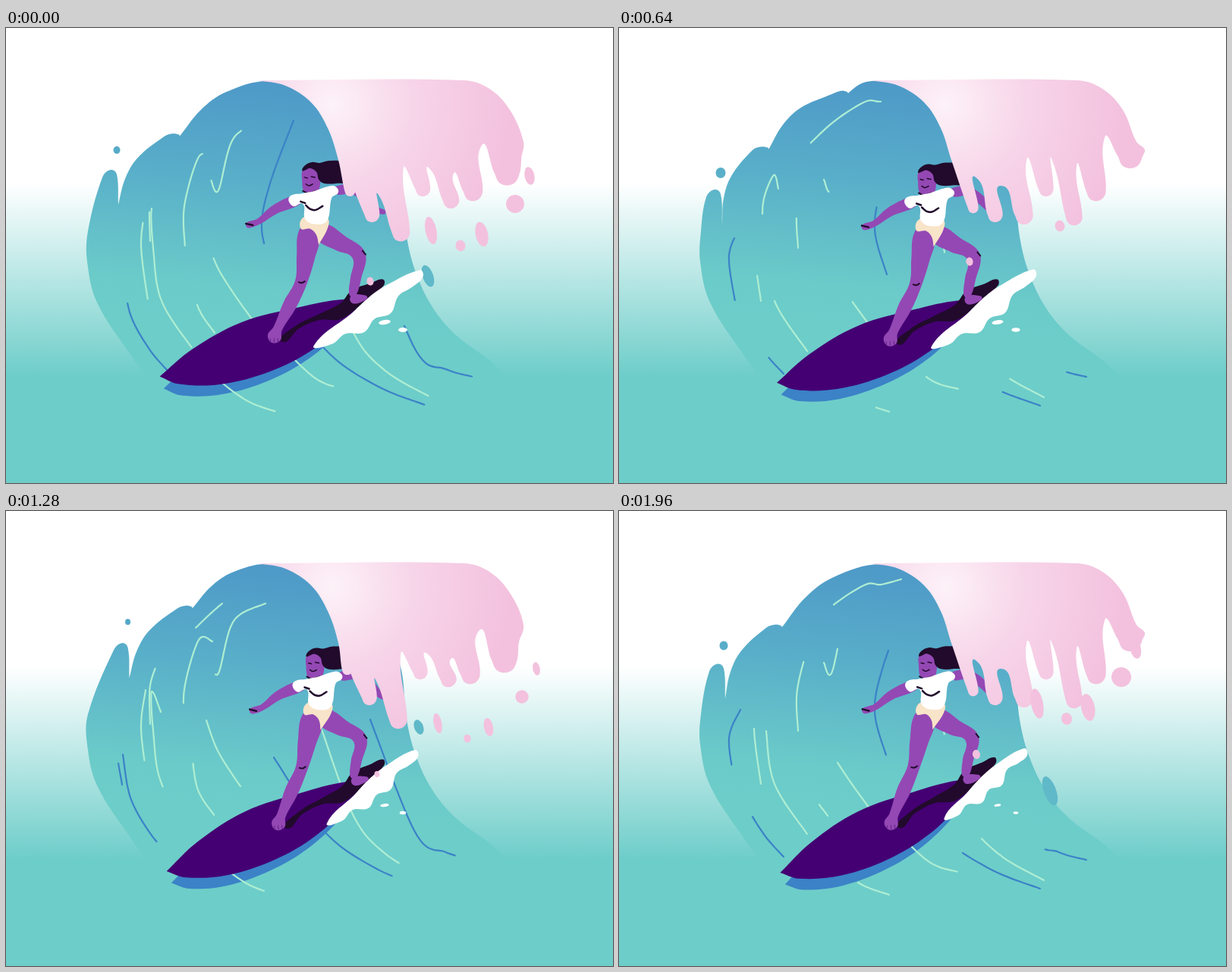
An HTML page with a canvas that plays this animation: 800x600 px, repeating every 2 s.

```html
<!DOCTYPE html>
<html lang="en">
<head>
<meta charset="utf-8">
<title>Surfer on a wave</title>
<style>
  html, body { margin: 0; width: 100%; height: 100%; overflow: hidden; background: #fff; }
  canvas { display: block; width: 800px; height: 600px; }
</style>
</head>
<body>
<canvas id="stage" width="800" height="600"></canvas>
<script>
const ctx = document.getElementById('stage').getContext('2d');
const { sin, cos, PI, min, max, hypot } = Math;

const pts = s => s.trim().split(/\s+/).map(p => p.split(',').map(Number));
const clamp = v => max(0, min(1, v));
const mix = (a, b, k) => a.map((v, i) => v + (b[i] - v) * k);

// Point at share u of a Catmull-Rom curve.
function along(p, u) {
  const n = p.length - 1, i = min(n - 1, Math.floor(u * n)), t = u * n - i;
  const [a, b, c, d] = [p[max(0, i - 1)], p[i], p[i + 1], p[min(n, i + 2)]];
  return b.map((v, j) => v + 0.5 * t * (c[j] - a[j] + t * (2 * a[j] - 5 * v + 4 * c[j] - d[j]
    + t * (3 * (v - c[j]) + d[j] - a[j]))));
}

// Smooth path through points; a doubled point makes a corner.
function trace(p, closed) {
  const n = p.length;
  const at = i => closed ? p[(i + n) % n] : p[max(0, min(n - 1, i))];
  const dir = i => {
    const [a, b] = [at(i - 1), at(i + 1)];
    const dx = b[0] - a[0], dy = b[1] - a[1], d = hypot(dx, dy) || 1;
    return [dx / d, dy / d];
  };
  ctx.beginPath();
  ctx.moveTo(...p[0]);
  for (let i = 0; i < (closed ? n : n - 1); i++) {
    const a = at(i), b = at(i + 1), u = dir(i), v = dir(i + 1);
    const h = hypot(b[0] - a[0], b[1] - a[1]) * 0.36;
    ctx.bezierCurveTo(a[0] + u[0] * h, a[1] + u[1] * h, b[0] - v[0] * h, b[1] - v[1] * h, ...b);
  }
}
function fill(p, color) {
  trace(p, true);
  ctx.fillStyle = color;
  ctx.fill();
}
function stroke(p, color, width) {
  trace(p, false);
  ctx.strokeStyle = color;
  ctx.lineWidth = width;
  ctx.lineCap = 'round';
  ctx.stroke();
}
function oval(x, y, rx, ry, color, tilt = 0) {
  ctx.fillStyle = color;
  ctx.beginPath();
  ctx.ellipse(x, y, max(0, rx), max(0, ry), tilt, 0, 2 * PI);
  ctx.fill();
}
// Rounded limb along joints given as x, y, half width.
function limb(joints, place, color) {
  const c = joints.map(j => place(j)), last = c.length - 1;
  const left = [], right = [];
  const axis = i => {
    const a = c[max(0, i - 1)], b = c[min(last, i + 1)];
    const d = hypot(b[0] - a[0], b[1] - a[1]);
    return [(b[0] - a[0]) / d, (b[1] - a[1]) / d];
  };
  const cap = (i, side) => {
    const [x, y] = axis(i), w = joints[i][2] * side * 0.8;
    return [c[i][0] + x * w, c[i][1] + y * w];
  };
  c.forEach(([x, y], i) => {
    const [ax, ay] = axis(i), w = joints[i][2];
    left.push([x + ay * w, y - ax * w]);
    right.unshift([x - ay * w, y + ax * w]);
  });
  fill([...left, cap(last, 1), ...right, cap(0, -1)], color);
}
function gradient(g, ...stops) {
  stops.forEach(([at, color]) => g.addColorStop(at, color));
  return g;
}

const SKIN = '#9448b4', INK = '#210a2b', BLUE = '#3b82c7', MINT = '#aeeed3', SEA = '#6dcdc9', PINK = '#f3c1de';
const sky = gradient(ctx.createLinearGradient(0, 205, 0, 460), [0, '#fff'], [1, SEA]);
const water = gradient(ctx.createLinearGradient(320, 70, 290, 400),
  [0, '#4e99c8'], [0.4, '#59afc9'], [0.82, '#6bcbc9'], [1, SEA]);
const foam = gradient(ctx.createRadialGradient(430, 100, 0, 430, 100, 235),
  [0, '#fdf2f8'], [0.45, '#f7d5e9'], [1, PINK]);

// --- Wave: five drawings, beat 0 to 4 ---

const climb = pts('126,213 138,187 170,163 205,150 236,125 292,83');
const foot = pts('200,480 200,480 165,432 120,362 107,308 108,268');
const back = pts('345,70 400,85 450,140 500,165 520,205 528,275 540,322 562,368 592,404 655,455 655,480 655,480');

// Ripples climb the back: a tall curl first, flattening towards the crest.
function drawBody(beat) {
  const shape = [...foot];
  let low = null;
  const join = to => {
    if (!low) return;
    const [dx, dy] = [to[0] - low[0], to[1] - low[1]];
    for (const u of [0.3, 0.6]) {
      const bulge = 0.13 * sin(PI * u);
      shape.push([low[0] + dx * u + dy * bulge, low[1] + dy * u - dx * bulge]);
    }
  };
  for (let age = beat; age <= 10; age += 5) {
    const [x, y] = along(climb, age / 10), tall = clamp((5 - age) / 2);
    join([x - 11, y + 4]);
    low = [x + 10, y + 3 + 43 * tall];
    shape.push([x - 11, y + 4 + 6 * tall], [x, y], [x + 8, y + 1 + 5 * tall], low, low);
  }
  join(back[0]);
  fill([...shape, ...back], water);

  const [x, y] = along(climb, beat / 10);
  oval(x + 8, y - 22 - 2 * beat, 6.5 - beat, 7 - beat, water);
  const rise = (beat + 4) % 5;
  oval(568 - 12 * rise, 369 - 42 * rise, 8 - rise, 20 - 5 * rise, '#5fb9c9', -0.35);
}

// Lanes the streaks run along, each with its lead in beats.
const lane = (lead, s) => ({ lead, path: pts(s) });
const pale = [
  lane(0, '330,392 300,350 278,314 264,276'), lane(0, '560,487 500,452 458,402 416,288'),
  lane(0, '248,426 205,360 194,290 192,238 204,265'), lane(0, '187,360 178,287 184,236'),
  lane(0, '236,290 235,235 254,170 272,172'), lane(0, '270,200 280,214 300,145 342,122'),
  lane(0, '356,506 315,490 262,450'), lane(1, '447,476 405,460 340,395'),
  lane(1, '429,296 423,250 428,222'), lane(2, '250,154 285,122 325,97 345,97 372,90'),
  lane(3, '190,281 190,230 204,194 210,212'), lane(4, '275,402 252,365 244,306')
];
const deep = [
  lane(0, '217,456 190,425 164,378 154,321'), lane(0, '555,498 487,471 419,422 353,325'),
  lane(0, '616,460 580,450 540,425 480,275'), lane(1, '353,325 337,265 348,205 379,122'),
  lane(2, '153,361 145,300 160,262')
];
function drawStreaks(list, beat, color) {
  for (const { lead, path } of list) {
    const age = (beat + lead) % 5;
    const head = min(1, 0.25 + age / 4), tail = (age / 4) ** 5;
    if (tail >= head) continue;
    const line = Array.from({ length: 13 }, (_, i) => along(path, tail + (head - tail) * i / 12));
    stroke(line, color, 2.2);
  }
}

// Drips: x, lowest y, half width, height of the gap to the right.
const drips = pts('455,228,7,205 484,256,10,216 522,275,12,182 551,222,10,181 588,244,11,189 617,228,13,152 662,201,17,168');
const lip = pts('332,69 332,69 368,76 402,98 424,132 438,174');
const rim = pts('682,150 664,108 637,80 603,69');
const drops = pts('590,274,7,8 471,321,5,6 551,254,8,20 618,259,9,18 662,219,13,13 681,182,7,13');

function drawFoam(beat) {
  const pull = cos((beat - 0.5) * 2 * PI / 5) * (beat < 3 ? 1 : 0.6);
  const hang = drips.map(([x, y, w, gap], i) =>
    [x + 2 + 12 * pull, y + 20 * pull * cos(i * PI / 2), w, gap - 10 * pull]);
  const edge = hang.flatMap(([x, y, w, gap], i) => {
    const next = hang[i + 1];
    return [[x - w, y - w], [x - w / 2, y - w * 0.12], [x + w / 2, y - w * 0.12], [x + w, y - w],
      [next ? (x + next[0]) / 2 - 11 : x + w + 2, gap]];
  });
  fill([...lip, ...edge, ...rim], foam);

  // The first two drops tear off one beat sooner.
  drops.forEach(([x, y, rx, ry], i) => {
    const age = beat - 1;
    if (age < 0 && i > 1) return;
    const size = 1 - (age / 3.5) ** 2;
    oval(x + 9 * age, y + 13 * age, rx * size, ry * size, PINK, -0.2);
  });
}

// --- Surfer ---

const board = pts(`201,457 201,457 245,421 310,386 385,367 445,357 462,362 445,388 400,425
  345,452 280,468 225,467`);
const shade = pts('362,412 380,392 412,376 440,362 455,345 480,336 496,331 497,339 470,362 440,383 412,384 385,395');
const rearArm = pts('436,213,6 455,212,6 472,223,6 488,239,4 497,242,3');
const frontArm = pts('382,226,7 352,239,6 332,254,4 318,259,4');
const rearLeg = pts('415,268,12 440,283,11 464,299,9 460,330,7 456,350,5');
const rearFoot = pts('473,355,3 457,357,6');
const frontLeg = pts('399,268,14 394,302,12 388,334,8 373,364,9 357,395,6 352,407,9');
const shorts = pts('387,263 392,248 422,250 423,262 411,285 411,285 408,272 400,264');
const shirt = pts('372,222 390,217 405,214 428,207 436,211 436,217 428,223 422,253 408,258 393,251 390,231 377,234');
const face = pts('390,186 389,200 392,215 402,217 411,213 411,190 400,182');
const hair = pts(`389,187 393,180 402,176 412,177 425,174 446,178 452,200 434,204 418,204 411,199
  408,189 400,184 394,186`);

function makeSurfer(turn) {
  const sway = -sin(turn - 0.2);
  const tilt = 3.2 * (1 - cos(turn - 0.5)) * PI / 180, c = cos(tilt), s = sin(tilt);
  const reach = max(0, -cos(turn + 0.5));
  const spray = 0.55 + 0.45 * cos(turn + 0.2);

  const onBoard = ([x, y]) => [
    352 + 6.5 * sway + (x - 352) * c + (y - 405) * s,
    405 + 7 * sway - (x - 352) * s + (y - 405) * c
  ];
  // Feet follow the board, the upper body has its own sway.
  const onBody = ([x, y]) =>
    mix([x + 6.5 * sway, y + 4.5 * sway], onBoard([x, y]), clamp((y - 255) / 90));
  const swing = (dx, dy, weight) => p => {
    const [x, y] = onBody(p), w = reach * clamp(weight(p[0]));
    return [x + dx * w, y + dy * w];
  };
  const frontSwing = swing(9, 18, x => (378 - x) / 60);
  const mark = (p, width, color = INK, place = onBody) => stroke(pts(p).map(place), color, width);

  return {
    shadow() {
      const cast = ([x, y]) => [x + 5 - (x - 201) * 0.03, y + 16 - (x - 201) * 0.035];
      fill(board.map(p => onBoard(cast(p))), BLUE);
    },
    board() {
      fill(board.map(onBoard), '#440073');
      fill(shade.map(onBoard), INK);
    },
    splash() {
      const root = onBoard(mix([447, 388], [404, 418], spray));
      const tip = onBoard([525 + 20 * spray, 328 - 9 * spray]);
      const top = pts('455,375 478,354 502,338').map(onBoard);
      const lobes = Array.from({ length: 7 }, (_, i) => {
        const u = (i + 1) / 8, [x, y] = mix(tip, root, u);
        const out = (5 + 17 * spray) * sin(PI * u) + (i % 2 ? -4 : 4);
        return [x + 0.57 * out, y + 0.82 * out];
      });
      fill([root, ...top, tip, [tip[0] + 4, tip[1] + 9], ...lobes], '#fff');
      oval(499, 388, 8 * spray, 3 * spray, '#fff', -0.15);
      oval(523, 398, 6 * spray, 3 * spray, '#fff');
    },
    figure() {
      limb(rearArm, swing(-20, -8, x => (x - 436) / 55), SKIN);
      fill(face.map(onBody), SKIN);
      fill(hair.map(swing(0, -9, x => (x - 408) / 35)), INK);
      mark('392,196 396,197', 1.5);
      mark('401,195 406,196', 1.5);
      mark('394,205 398,207 403,205', 1.5);
      mark('390,214 397,217 407,214', 2);
      limb(rearLeg, onBody, SKIN);
      limb(rearFoot, onBody, SKIN);
      limb(frontLeg, onBody, SKIN);
      mark('385,334 389,335 393,333', 2);
      mark('469,293 473,298', 2);
      for (const x of [347, 352, 357]) mark(`${x},408 ${x},413`, 1, '#5d2482');
      fill(shorts.map(onBody), '#f8e4c8');
      limb(frontArm, frontSwing, SKIN);
      mark('315,257 324,259', 2.5, INK, frontSwing);
      fill(shirt.map(onBody), '#fff');
      mark('394,233 400,238 407,239 416,234', 2.5);
      mark('387,228 393,230', 2.5);
    }
  };
}

function draw(time) {
  const beat = (Math.floor(time / 80) + 2) % 5;
  const surfer = makeSurfer(time / 720 * 2 * PI);

  ctx.fillStyle = sky;
  ctx.fillRect(0, 0, 800, 600);
  drawBody(beat);
  surfer.shadow();
  drawStreaks(pale, beat, MINT);
  drawStreaks(deep, beat, BLUE);
  surfer.board();
  surfer.splash();
  surfer.figure();
  drawFoam(beat);
}

const start = performance.now();
function tick() {
  const time = (performance.now() - start) % 2000;
  draw(Math.floor(time / 40) * 40);
  requestAnimationFrame(tick);
}
tick();
</script>
</body>
</html>
```
